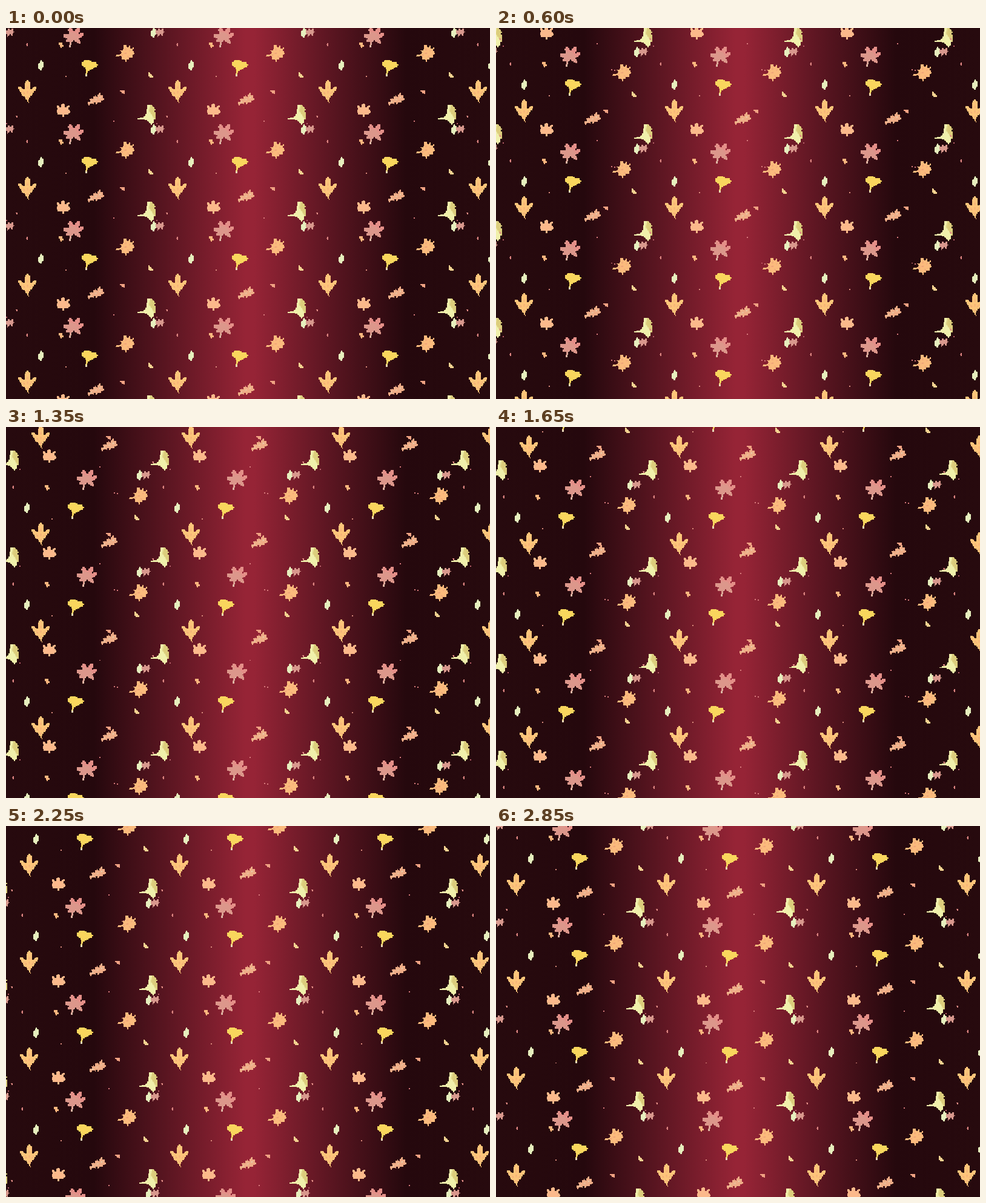
An HTML page with a canvas for the animation above (3 s loop, 799 by 613 pixels).

```html
<!DOCTYPE html>
<html lang="en">
<head>
<meta charset="utf-8">
<title>Falling leaves</title>
<style>
html, body { margin: 0; width: 100%; height: 100%; overflow: hidden; }
body {
  background: linear-gradient(90deg, #270a0e 0, #25080d 145px, #5d1622 272px,
    #962436 395px, #962436 410px, #5d1622 530px, #25080d 660px, #270a0e 799px);
}
canvas { display: block; }
</style>
</head>
<body>
<canvas id="stage" width="799" height="613"></canvas>
<script>
const W = 799, H = 613, TILE_W = 248, TILE_H = 160;
const STEPS = 20, STEP_MS = 150, FALL = 8;
const CELL = 1.5, SIZE = 32, HALF = SIZE * CELL / 2;

// Sideways drift per step for the two swaying groups
const drift = {
  a: [0, 2, 5, 8, 11, 14, 18, 21, 22, 22, 21, 19, 15, 11, 7, 3, 0, -2, -3, -2],
  b: [0, -2, -5, -8, -11, -15, -18, -21, -22, -23, -23, -22, -20, -16, -12, -8, -5, -2, 0, 0]
};

const slim = 'M1-9L4-6V2L0 8L-4 5V-3Z';
const dot = 'M0 0h2v2h-2Z';

// Drawn back to front; x, y is the centre at step 0
const leaves = [
  { sway: 'b', x: 98, y: 79, shape: dot, fill: '#d98a7c' },
  { sway: 'b', x: 177, y: 153, shape: dot, fill: '#d77a7c' },
  { sway: 'b', x: 201, y: 36, shape: dot, fill: '#d77a7c' },
  { sway: 'b', x: 206, y: 37, shape: dot, fill: '#d77a7c' },
  { sway: 'a', x: 248, y: 157, shape: dot, fill: '#b9606a' },
  // broad three-lobed leaf
  { sway: 'a', x: 35, y: 104, fill: '#fdc57a',
    shape: 'M0-18L3-16L5-12L5-7L4-2L7-3L11-7L16-7L14-2L10 2L9 6L5 8L2 13L1 16L3 19H1L-1 15L-4 10L-9 7L-10 3L-14-2L-16-7L-11-7L-7-3L-4-2L-5-7L-4-14Z',
    veins: 'M0-8V-4M0 0V4M-7 1L-4 5M7 1L4 5M0 9V12', vein: '#f2a877' },
  // red star leaf
  { sway: 'a', x: 111, y: 174, fill: '#dc978b',
    shape: 'M-7-15L-3-15L1-8L6-14L11-16L11-10L8-5L16-6L17-2L12 2L8 3L12 8L11 12L6 10L1 6L-3 9L-5 18H-8L-5 8L-11 10L-13 7L-9 3L-15 2L-17-1L-16-4L-7-5L-9-11Z',
    shade: 'M-8-18H20V4L10 2L4-6L-6-8Z', tint: '#e48f88',
    veins: 'M-2 8L-6 18', vein: '#dfc9b4' },
  // orange maple with its stem to the left
  { sway: 'a', x: 200, y: 41, fill: '#fbbb7d',
    shape: 'M-5-14L-2-13L0-9L4-12L5-7L11-9L9-4L12 1L8 3L10 8L4 7L2 11L-1 11L-3 16L-4 10L-10 11L-8 6L-12 5L-20 6V4L-12 3L-9 0L-13-5L-7-5Z',
    veins: 'M-10 4L-7 3M-5 1L-1 0M3-3L5-4M0 5L3 7M-3-7V-4', vein: '#ee9f77' },
  // oak leaf
  { sway: 'a', x: 148, y: 117, fill: '#efad87',
    shape: 'M-14 9L-13 4L-9 4L-10 0L-6-1L-4 2L-4-4L0-6L3-2L4-9L8-10L8-5L14-7L11-3L14-1L12 3L8 2L9 6L4 5L1 9L-2 5L-4 9L-8 6L-10 10Z',
    veins: 'M-10 6L-6 4M-2 2L1 1M5-1L8-3', vein: '#e5cfae' },
  // pale fan
  { sway: 'a', x: 236, y: 143, fill: '#f0f0ab',
    shape: 'M-3-16H3L8-13L10-8L8-6L11-4L10 4L11 8L7 8L8 13L4 16L0 13L-3 9L-9 8L-19 8V6L-11 5L-6 1L-4-5Z',
    shade: 'M2-17L14-12V8H9L5 1L0-6Z', tint: '#dccd7c' },
  // crown-shaped small maple
  { sway: 'b', x: 94, y: 135, fill: '#fbb98b',
    shape: 'M-11-9L-7-6L-4-4L-2-9L0-12L2-9L4-4L7-6L11-9L9-1L12 3L8 7H1V12H-1V7H-8L-11 3L-9-1Z' },
  // yellow fan
  { sway: 'b', x: 138, y: 66, fill: '#f9d65d',
    shape: 'M-14-9L-8-13L-2-14L4-11L9-11L13-5L12-2L8-2L5 1L2 3L-2 4L-4 8L-5 14H-8L-6 7V3L-8-1L-11-3L-13-5Z',
    shade: 'M-10 10H0V16H-10Z', tint: '#ead9bb' },
  { sway: 'b', x: 57, y: 62, shape: slim, fill: '#e6efbd' },
  { sway: 'b', x: 243, y: 168, shape: slim, fill: '#e6efbd' },
  { sway: 'b', x: 254, y: 167, fill: '#d8988d',
    shape: 'M-7-4L-3-3L-2-7L1-4L6-7L5-3L8 0L4 1L4 6L0 3L-4 8L-4 3L-7 2Z' },
  { sway: 'b', x: 191, y: 106, shape: 'M-4-3H4L5 3L1 1Z', fill: '#f0a283' },
  { sway: 'b', x: 238, y: 77, shape: 'M-3-5L4 2V5L-2 4Z', fill: '#f4d391' },
  { sway: 'b', x: 90, y: 28, shape: 'M-4-4H3L4 3L0 4Z', fill: '#fbb77f' },
  { sway: 'b', x: 34, y: 28, shape: 'M-1-1L2-3V0L0 2Z', fill: '#dc8480' },
  { sway: 'b', x: 17, y: 146, shape: 'M-2-2H2V2H0Z', fill: '#e08b84' },
  // brief pale glint
  { sway: 'a', x: -10, y: 95, only: 7, vein: '#bdeadf',
    veins: 'M-9 7L-5 4L-6 0L-2-2L-3 5M0 4L1-5L3-7M4 3L9-7M4 3L3-3L7-6' }
];

function makeSprite(leaf) {
  const canvas = document.createElement('canvas');
  canvas.width = canvas.height = SIZE;
  const g = canvas.getContext('2d');
  g.translate(SIZE / 2, SIZE / 2);
  g.scale(1 / CELL, 1 / CELL);
  if (leaf.shape) {
    g.fillStyle = leaf.fill;
    g.fill(new Path2D(leaf.shape));
    g.globalCompositeOperation = 'source-atop';
  }
  if (leaf.shade) {
    g.fillStyle = leaf.tint;
    g.fill(new Path2D(leaf.shade));
  }
  if (leaf.veins) {
    g.strokeStyle = leaf.vein;
    g.lineWidth = 1.5;
    g.stroke(new Path2D(leaf.veins));
  }
  // Hard, blocky edges
  const img = g.getImageData(0, 0, SIZE, SIZE);
  for (let i = 3; i < img.data.length; i += 4) img.data[i] = img.data[i] > 110 ? 255 : 0;
  g.putImageData(img, 0, 0);
  return canvas;
}

for (const leaf of leaves) leaf.sprite = makeSprite(leaf);

const ctx = document.getElementById('stage').getContext('2d');
ctx.imageSmoothingEnabled = false;
const wrap = (v, n) => (v % n + n) % n;

function draw(step) {
  ctx.clearRect(0, 0, W, H);
  for (const { sway, x, y, only, sprite } of leaves) {
    if (only !== undefined && only !== step) continue;
    const left = wrap(x + drift[sway][step], TILE_W) - TILE_W - HALF;
    const top = wrap(y + step * FALL, TILE_H) - TILE_H - HALF;
    for (let py = top; py < H; py += TILE_H)
      for (let px = left; px < W; px += TILE_W)
        ctx.drawImage(sprite, px, py, SIZE * CELL, SIZE * CELL);
  }
}

let shown = -1;
function tick() {
  const step = Math.floor(performance.now() / STEP_MS) % STEPS;
  if (step !== shown) draw(shown = step);
  requestAnimationFrame(tick);
}
tick();
</script>
</body>
</html>
```
